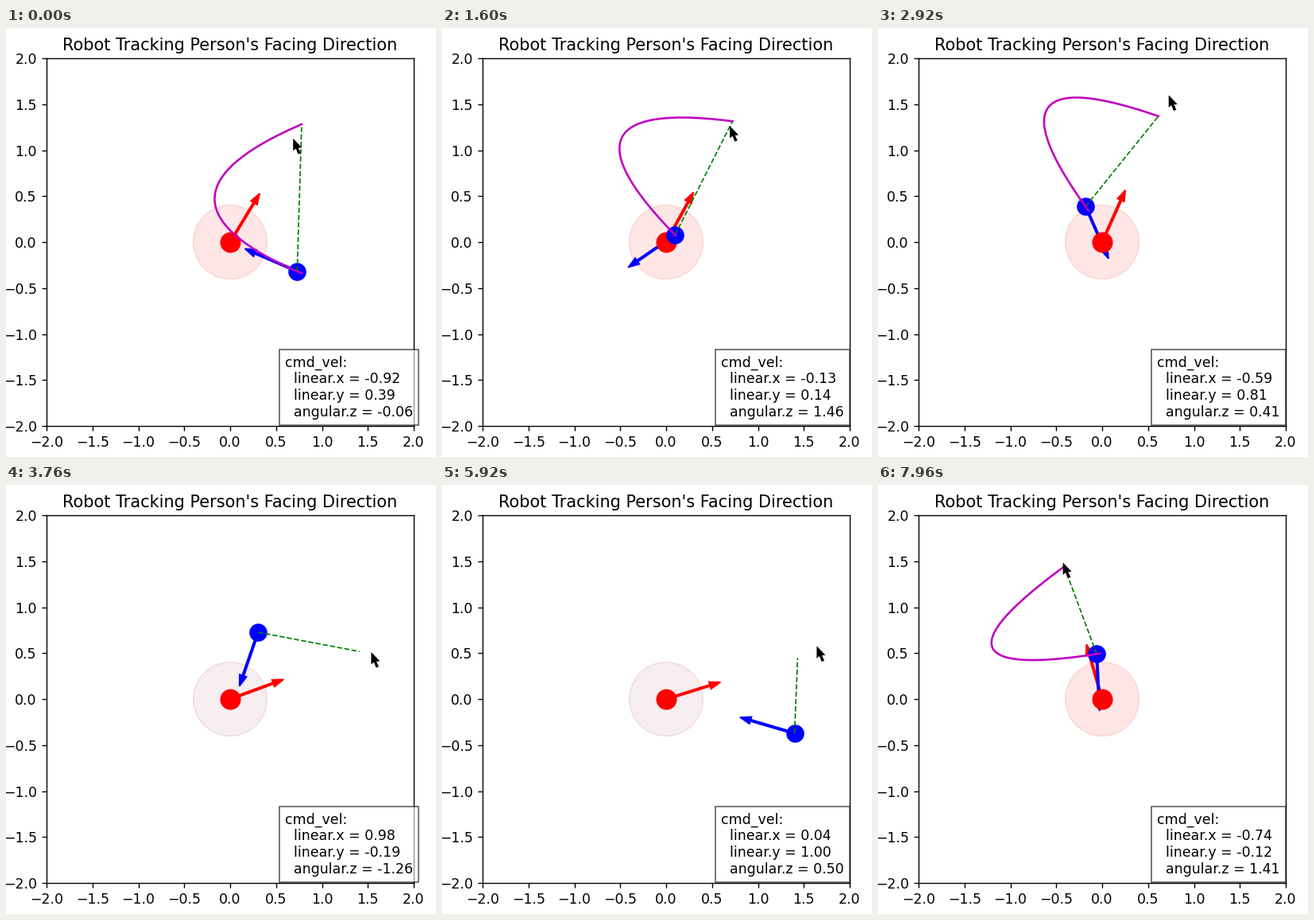
A matplotlib script that plays this animation: 541 px wide and 539 px high, repeating every 8 s.

```python
import math
import numpy as np
import matplotlib.pyplot as plt
from matplotlib.animation import FuncAnimation
from matplotlib.patches import Circle, FancyArrow, Polygon
from matplotlib.transforms import IdentityTransform

W, H, DPI = 541, 539, 125
FRAMES, STEP_MS = 200, 40
RATE = 1.16            # simulated seconds per second of playback
DT = 0.055             # simulated seconds per control step
LEAD = 1.5             # goal distance in front of the person
TURN_MAX, TURN_GAIN = 1.5, 20
DIRECT = (3.17, 5.95)  # span in which the robot drives straight to its goal
UNIT = 115.5           # pixels per data unit
CENTER = (282, 269.5)  # person's place on the stage

# time, x, y that the robot passes through
STOPS = np.array([
    (0, 0.73, -0.318), (1.6, 0.097, 0.078), (2.92, -0.18, 0.388),
    (3.17, -0.37, 0.62), (3.76, 0.304, 0.727), (4.88, 1.003, 0.11),
    (5.45, 1.35, -0.46), (5.95, 1.4, -0.34), (6.8, 0.503, 0.085),
    (7.96, -0.06, 0.492)])
# time, facing angle (deg), pointer distance from the person
LOOKS = np.array([
    (0, 58.7, 1.32), (1.6, 61.2, 1.44), (2.92, 65.9, 1.76), (3.76, 20.2, 1.62),
    (4.88, -17.1, 1.74), (5.35, -22.5, 1.75), (5.95, 19, 1.74), (6.8, 54.1, 1.77),
    (7.96, 106, 1.55)])
CURSOR = np.array([(0, 0), (0, 15.5), (3.4, 12.6), (6.2, 19.6),
                   (9.6, 18.3), (6.6, 11.8), (11, 11.4)])


def hermite(s, span, p0, p1, v0, v1):
    m0, m1 = v0 * span, v1 * span
    return (((2 * (p0 - p1) + m0 + m1) * s + 3 * (p1 - p0) - 2 * m0 - m1) * s + m0) * s + p0


def locate(t, times):
    """Segment index, progress inside it and its length."""
    i = int(np.clip(np.searchsorted(times, t, side="right") - 1, 0, len(times) - 2))
    span = times[i + 1] - times[i]
    return i, (t - times[i]) / span, span


def monotone_slopes(times, values):
    d = np.diff(values, axis=0) / np.diff(times)[:, None]
    prod, total = d[:-1] * d[1:], d[:-1] + d[1:]
    inner = np.where(prod > 0, 2 * prod / np.where(total == 0, 1, total), 0)
    return np.vstack([d[:1], inner, d[-1:]])


LOOK_T, LOOK_V = LOOKS[:, 0], LOOKS[:, 1:]
LOOK_RATE = monotone_slopes(LOOK_T, LOOK_V)


def look_at(t):
    """Unit facing vector and pointer distance."""
    i, s, span = locate(t, LOOK_T)
    deg, reach = hermite(s, span, LOOK_V[i], LOOK_V[i + 1], LOOK_RATE[i], LOOK_RATE[i + 1])
    a = math.radians(deg)
    return np.array([math.cos(a), math.sin(a)]), reach


def control_point(start, goal):
    """Middle point of a curve bulging to the left of the line start-goal."""
    d = goal - start
    size = math.hypot(*d)
    bulge = math.sqrt(max(5.1 - 0.57 * size ** 2, 1))
    return (start + goal) / 2 + np.array([-d[1], d[0]]) / size * bulge


def command(pos, goal, direct):
    """Velocity toward the goal, slowed so the robot can keep facing the person."""
    d = (goal if direct else control_point(pos, goal)) - pos
    d = d / math.hypot(*d)
    swing = abs(pos[0] * d[1] - pos[1] * d[0]) / (pos @ pos)
    speed = min(1, TURN_MAX / max(swing, 1e-6))
    if direct:
        speed = min(speed, 2 * math.hypot(*(goal - pos)))
    return d * speed


def is_direct(t):
    return DIRECT[0] <= t < DIRECT[1]


def robot_at(t):
    i, s, span = locate(t, STOPS[:, 0])
    (t0, *p0), (t1, *p1) = STOPS[i], STOPS[i + 1]
    p0, p1 = np.array(p0), np.array(p1)
    v0, v1 = (RATE * command(p, LEAD * look_at(k)[0], is_direct(t0))
              for p, k in ((p0, t0), (p1, t1)))
    return hermite(s, span, p0, p1, v0, v1)


def simulate():
    """Position, heading and turn rate for every frame."""
    states, heading = [], None
    for n in range(FRAMES):
        pos = robot_at(n * STEP_MS / 1000)
        bearing = math.atan2(-pos[1], -pos[0])
        if heading is None:
            heading = bearing + 0.003
        err = math.remainder(bearing - heading, 2 * math.pi)
        turn = max(-TURN_MAX, min(TURN_MAX, TURN_GAIN * err))
        states.append((pos, heading, turn))
        heading += turn * RATE * STEP_MS / 1000
    return states


STATES = simulate()

fig = plt.figure(figsize=((W + 1e-4) / DPI, (H + 1e-4) / DPI), dpi=DPI)
# Slight offsets keep half-pixel ticks rounding to the right side.
ax = fig.add_axes([51.01 / W, 38.999 / H, 461.988 / W, 462 / H])
ax.set(xlim=(-2, 2), ylim=(-2, 2))
ax.set_xticks(np.arange(-2, 2.1, 0.5))
ax.set_yticks(np.arange(-2, 2.1, 0.5))
ax.set_title("Robot Tracking Person's Facing Direction")


def add_arrow(color):
    return ax.add_patch(FancyArrow(0, 0, 0.5, 0, width=0.02, head_width=0.08,
                                   head_length=0.12, color=color))


zone = ax.add_patch(Circle((0, 0), 0.4))
face_arrow = add_arrow("red")
robot_arrow = add_arrow("blue")
ax.plot([0], [0], "o", color="red", ms=14)
robot_dot, = ax.plot([], [], "o", color="blue", ms=12)
sight, = ax.plot([], [], "--", color="green", lw=1)
route, = ax.plot([], [], color="m", lw=1.5)
readout = ax.text(0.65, 0.0175, "", transform=ax.transAxes, fontsize=10, va="bottom",
                  bbox=dict(facecolor="white", alpha=0.6))
cursor = Polygon(CURSOR, closed=True, facecolor="black", lw=0,
                 transform=IdentityTransform(), zorder=10)
fig.add_artist(cursor)


def update(n):
    t = n * STEP_MS / 1000
    direct = is_direct(t)
    pos, heading, turn = STATES[n]
    look = look_at(t)[0]
    goal = LEAD * look
    vel = command(pos, goal, direct)
    start = pos - vel * DT
    vel = command(start, goal, direct)

    face_arrow.set_data(dx=0.5 * look[0], dy=0.5 * look[1])
    robot_arrow.set_data(x=pos[0], y=pos[1],
                         dx=0.5 * math.cos(heading), dy=0.5 * math.sin(heading))
    robot_dot.set_data(pos[:1], pos[1:])
    sight.set_data(*np.array([pos, goal]).T)
    s = np.linspace(0, 1, 60)[:, None]
    curve = ((1 - s) ** 2 * start + 2 * s * (1 - s) * control_point(start, goal)
             + s ** 2 * goal)
    route.set_data(*curve.T)
    route.set_visible(not direct)
    zone.set_facecolor("#f7eeef" if direct else "#ffe6e6")
    zone.set_edgecolor("#f2dfe0" if direct else "#fad9d6")
    readout.set_text(f"cmd_vel:\n  linear.x = {vel[0]:.2f}\n"
                     f"  linear.y = {vel[1]:.2f}\n  angular.z = {turn:.2f}")

    # The person's gaze trails the pointer a little.
    aim, reach = look_at(min(t + 0.04, LOOK_T[-1]))
    tip = np.array(CENTER) + UNIT * reach * aim * [1, -1]
    shape = tip + CURSOR
    cursor.set_xy(np.column_stack([shape[:, 0], H - shape[:, 1]]))
    return ()


anim = FuncAnimation(fig, update, frames=FRAMES, interval=STEP_MS,
                     init_func=lambda: update(0), repeat=True, repeat_delay=0)
plt.show()
```
